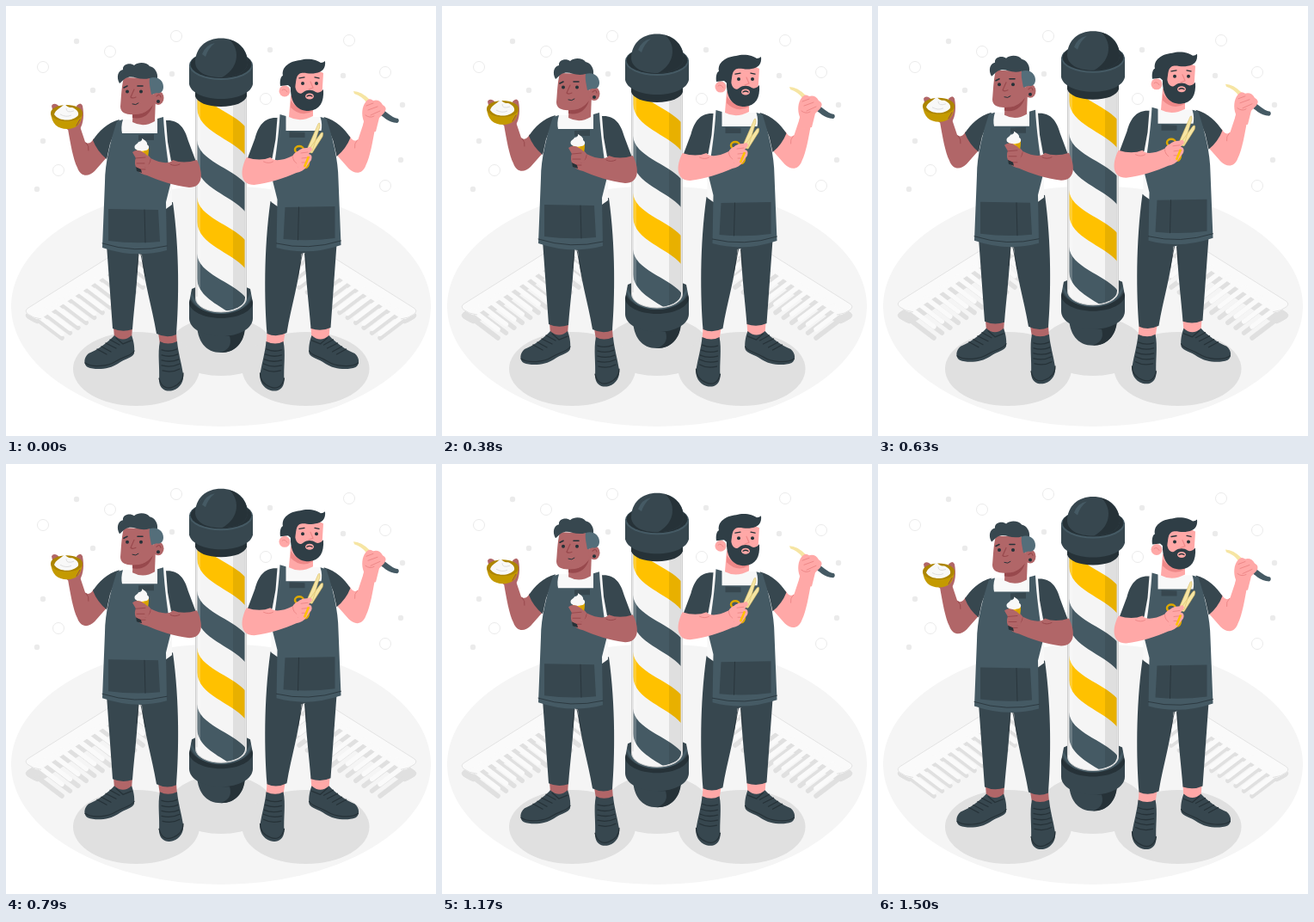
Write an HTML page that moves like this. It is 500 by 500 pixels and loops after 1.54 s.

```html
<!DOCTYPE html>
<html lang="en">
<head>
<meta charset="utf-8">
<title>Barbers</title>
<style>
  html, body { margin: 0; width: 100%; height: 100%; overflow: hidden; background: #fff; }
  svg { display: block; width: 100vw; height: 100vh; }
  .dark { fill: #37474f; }
  .slate { fill: #455a64; }
  .ink { fill: #263238; }
  .white { fill: #f8f8f8; }
  .skin { fill: var(--skin); }
  .shade { fill: var(--shade); }
  .gold { fill: #ffc100; }
  .line { fill: none; stroke: #263238; stroke-linecap: round; stroke-linejoin: round; }
  .fold { fill: none; stroke: var(--shade); stroke-linecap: round; }
  .shadow { fill: #e0e0e0; }
  .brown { --skin: #b16668; --shade: #98494d; }
  .pink { --skin: #ffa8a7; --shade: #ee8888; }
</style>
</head>
<body>
<svg viewBox="0 0 500 500">
  <defs>
    <clipPath id="tube"><path d="M222 95H278V340A28 15 0 0 1 222 340Z"/></clipPath>

    <g id="shoes">
      <path class="skin" d="M125 373H147L146 388Q136 394 126 386ZM177 380H198L199 393Q188 398 179 393Z"/>
      <path class="dark" d="M126 383C119 391 106 400 96 404C90 409 90 417 95 420C105 424 121 422 130 416C138 410 147 409 149 404C150 396 148 388 146 383Q136 392 126 383Z"/>
      <path class="line" d="M92 415C100 421 119 419 128 413C138 407 146 407 149 401" stroke-width="1.2"/>
      <path class="line" d="M121 388L132 394M116 392L128 398M111 396L122 402M106 399L117 405M128 386L136 393L146 389" stroke-width="1.3"/>
      <path class="dark" d="M179 390C176 404 179 420 178 436C179 446 186 449 194 447C203 444 207 436 206 428C204 415 200 402 199 390Q188 395 179 390Z"/>
      <path class="line" d="M178 433C180 443 187 446 194 443C202 440 206 434 206 427" stroke-width="1.2"/>
      <path class="line" d="M181 400Q190 403 199 399M181 406Q191 409 200 405M181 412Q192 415 201 411M181 418Q192 421 202 416M182 424Q193 427 202 422" stroke-width="1.3"/>
    </g>

    <g id="legs">
      <path class="dark" d="M117 278L124 375Q135 380 147 376C149 350 153 320 154 288L158 289C160 320 170 350 175 381Q187 387 198 382C201 345 202 285 194 228L180 232V278Z"/>
      <path class="line" d="M154 289L152 310M157 289L162 314" stroke-width=".8"/>
    </g>

    <g id="torso">
      <path class="white" d="M134 132C120 138 119 160 117 185V212L186 236L193 231V200L190 132Z"/>
      <path class="skin" d="M102 154C99 160 95 161 92 158L85 137L72 143C75 160 78 178 83 188C87 199 96 199 103 192L118 175Z"/>
      <path class="fold" d="M93 159Q97 163 96 168" stroke-width="1"/>
      <path class="dark" d="M132 132C117 136 108 146 101 156Q106 169 117 178L121 160Z"/>
      <path class="slate" d="M129 134L136 132C134 138 134 144 135 148H176L176 131L183 129C184 150 188 180 192 204L186 228L187 284Q150 294 112 281L115 205C115 182 122 155 129 134Z"/>
      <path class="dark" d="M119 236L177 237L179 274Q149 277 119 273ZM154 150L172 149V156L154 156Z"/>
      <path class="line" d="M161 237L162 275M112 276Q150 288 187 279" stroke-width=".8"/>
      <path class="dark" d="M186 133C201 132 208 142 212 157L221 181Q204 187 192 180L188 158Z"/>
    </g>

    <g id="forearm">
      <path class="skin" d="M222 179C230 195 229 211 213 211C195 209 178 203 164 197C153 195 148 187 151 177C155 168 165 171 168 177C180 183 190 184 194 179Q206 184 222 179Z"/>
      <path class="fold" d="M202 184Q196 187 191 184M168 178Q168 184 162 187M152 184L161 184M154 190L162 190" stroke-width="1"/>
    </g>

    <g id="comb">
      <path d="M26 351L150 273L165 281L41 363Q36 365 32 362L25 358Q21 354 26 351Z"/>
      <g id="teeth"></g>
    </g>
  </defs>

  <g fill="none" stroke="#ebebeb" id="rings"></g>
  <g fill="#ebebeb" id="dots"></g>
  <ellipse cx="250" cy="349" rx="244" ry="140" fill="#f5f5f5"/>
  <g class="shadow">
    <ellipse cx="250" cy="396" rx="60" ry="34"/>
    <ellipse cx="151.500" cy="422" rx="73.500" ry="43"/>
    <ellipse cx="348.500" cy="422" rx="74" ry="43"/>
  </g>
  <g class="shadow" stroke="#e0e0e0">
    <use href="#comb" y="5"/>
    <use href="#comb" y="5" transform="matrix(-1 0 0 1 500 0)"/>
  </g>

  <g id="float">
    <g fill="#fafafa" stroke="#fafafa">
      <use href="#comb"/>
      <use href="#comb" transform="matrix(-1 0 0 1 500 0)"/>
    </g>
    <path d="M41 364L32 362L25 358Q21 354 26 351L150 273M459 364L468 362L475 358Q479 354 474 351L350 273" fill="none" stroke="#e3e3e3"/>

    <!-- pole -->
    <path class="dark" d="M222 368C222 390 232 403 250 403S278 390 278 368Z"/>
    <path class="ink" d="M250 384C262 384 272 380 278 374C277 392 266 403 250 403C262 398 262 391 260 384Z"/>
    <path class="dark" d="M216 329Q250 312 284 329L287 345V363C287 375 271 384 250 384S213 375 213 363V345Z"/>
    <path class="ink" d="M213 345C213 354 229 363 250 363S287 354 287 345L286 341Q277 357 250 357T214 341Z"/>
    <path class="slate" d="M216 332C218 345 232 354 250 354S282 345 284 332L285 337C282 350 268 358 250 358S218 350 215 337Z"/>
    <path d="M220.500 95H279.500V340A29.500 16 0 0 1 220.500 340Z" fill="#f5f5f5" stroke="#cfcfcf"/>
    <g clip-path="url(#tube)">
      <g id="stripes"></g>
      <path d="M264 95H278V360H264Z" opacity=".09"/>
      <path d="M222 95H226V360H222Z" fill="#fff" opacity=".2"/>
    </g>
    <path d="M222 105V338M278 105V338" stroke="#d5d5d5" fill="none"/>
    <path class="ink" d="M220 90H280V105C278 112 266 117 250 117S222 112 220 105Z"/>
    <path class="dark" d="M213 68H287V91C285 101 270 108 250 108S215 101 213 91Z"/>
    <ellipse class="slate" cx="250" cy="69" rx="37" ry="17"/>
    <ellipse class="ink" cx="250" cy="68" rx="35.500" ry="16"/>
    <path class="dark" d="M220 66C220 48 233 37.500 250 37.500S281 48 281 66C280 77 267 83 250 83S221 77 220 66Z"/>
    <path class="ink" d="M260 39C273 43 281 54 281 66C280 77 267 83 251 83C269 74 274 53 260 39Z"/>
    <path class="slate" d="M228 56Q232 45 243 43Q235 49 232 59Z"/>

    <!-- left barber -->
    <g class="brown">
      <use href="#shoes"/>
      <use href="#legs"/>
      <use href="#torso"/>
      <path class="skin" d="M148 115L147 135Q160 142 173 134L174 108Z"/>
      <path class="shade" d="M147 124Q160 129 171 115Q165 133 147 130Z"/>
      <path class="skin" d="M137 83C134 95 134 107 133 117C133 125 142 127 150 126C162 126 170 118 172 110L171 84Z"/>
      <ellipse class="skin" cx="177" cy="107" rx="6.500" ry="8"/>
      <path class="fold" d="M175 105Q179 101 180 106M149 97L145 106Q147 108 151 106" stroke-width="1.200"/>
      <path class="dark" d="M132 90C128 83 130 75 136 74C135 68 144 65 149 69C155 64 164 66 167 70C173 71 177 78 176 84L168 90L167 84C155 87 149 81 142 83C137 84 135 88 132 90Z"/>
      <path d="M167 84C175 81 183 86 183 94C183 100 179 102 175 101L169 103C168 96 166 90 167 84Z" fill="#546e7a"/>
      <circle class="ink" cx="141" cy="99.500" r="2"/>
      <circle class="ink" cx="157" cy="99.500" r="2"/>
      <circle class="ink" cx="177" cy="111" r="2"/>
      <path class="line" d="M137 95L141 93M153 93L159 93" stroke-width="1.600"/>
      <path class="line" d="M147 114Q151 116 154 113" stroke-width="1"/>

      <path class="skin" d="M72 144C65 138 54 126 53 116Q55 112 60 115L70 126L84 125L82 116Q87 111 89 116C91 127 90 136 86 143Z"/>
      <path d="M52 124C53 137 60 143 71 143S88 137 89 124Z" fill="#c49a00"/>
      <ellipse cx="70.500" cy="124.500" rx="18.500" ry="9.500" fill="#ad8500"/>
      <path class="white" d="M56 126C58 120 63 119 68 114C71 116 71 118 77 118C82 120 85 123 84 127C79 134 62 135 56 126Z"/>
      <path d="M70 119Q70 125 79 122M63 126Q70 130 76 127" fill="none" stroke="#dedede"/>
      <path class="fold" d="M82 139L86 132" stroke-width="1"/>

      <use href="#forearm"/>
      <path class="ink" d="M151 187L157 190L158 194L152 192Z"/>
      <path class="gold" d="M152 165H166L165 175L153 177Z"/>
      <path d="M160 166H166L165 175L161 176Z" fill="#d9a400"/>
      <path class="white" d="M150 166C148 161 153 161 154 158Q159 157 158 154C162 156 165 159 164 161C168 163 166 168 162 168Q154 170 150 166Z"/>
      <path class="skin" d="M147 170Q153 165 161 171L168 177L165 187L153 188Q148 184 151 177Z"/>
      <path class="fold" d="M151 177L162 176M152 183L161 183" stroke-width="1"/>
    </g>

    <!-- right barber -->
    <g class="pink">
      <g transform="matrix(-1 0 0 1 501.500 0)">
        <use href="#shoes"/>
        <use href="#legs" y="-1"/>
        <use href="#torso" y="-3"/>
      </g>
      <path class="skin" d="M331 104L329 129Q342 136 357 128V116Z"/>
      <path class="shade" d="M331 110Q339 122 357 122Q343 130 331 118Z"/>
      <circle class="skin" cx="324" cy="99" r="6.500"/>
      <path class="fold" d="M321 98Q324 95 327 100" stroke-width="1"/>
      <path class="skin" d="M335 76C333 90 332 102 335 111Q353 124 367 110L369 78Q350 68 335 76Z"/>
      <g fill="#2f3e46">
        <path d="M319 93C318 86 320 81 322 81C320 71 330 64 342 63C352 60 362 63 366 66Q369 66 371 64C372 72 368 77 360 78C352 80 346 76 341 79C336 82 338 91 335 98L328 92Z"/>
        <path d="M331 92L336 92C337 101 342 104 346 100C350 97 356 97 360 100C364 102 367 99 369 97C370 112 365 121 352 122C338 122 330 112 331 92Z"/>
      </g>
      <ellipse class="skin" cx="353" cy="105" rx="5" ry="3.500"/>
      <path class="line" d="M350 105Q353 103 356 105M341 84L347 83M359 83L364 84" stroke-width="1.300"/>
      <circle class="ink" cx="345" cy="90" r="2"/>
      <circle class="ink" cx="361" cy="90" r="2"/>
      <path class="fold" d="M354 88L357 95L352 97" stroke-width="1.200"/>

      <path d="M404 99Q413 99 423 109L419 112Q414 105 405 102Z" fill="#f6e5a3"/>
      <path class="slate" d="M433 119C443 121 447 130 456 131Q458 134 455 136C444 136 438 127 431 124Z"/>
      <path class="skin" d="M416 134C413 126 414 117 418 112Q422 106 427 110Q434 108 438 115Q444 118 440 124L434 130L430 146L414 148Z"/>
      <path class="fold" d="M419 116L427 113M421 121L432 117M424 127L435 122M418 127Q423 131 428 128" stroke-width="1"/>

      <g fill="none" stroke="#dda900" stroke-width="2.500">
        <ellipse cx="341" cy="167" rx="5" ry="4"/>
        <ellipse cx="348" cy="182" rx="4" ry="6"/>
      </g>
      <use href="#forearm" transform="matrix(-1 0 0 1 501.500 -3)"/>
      <path d="M349 169L363 137Q365 134 365 140L356 169ZM350 170L366 148Q370 145 368 152L356 171Z" fill="#f6e5a3" stroke="#d9bd65" stroke-width=".6"/>
      <path class="skin" d="M335 174Q341 164 351 165Q355 162 356 167L352 172Q357 173 355 179L349 187L340 189Z"/>
      <path class="fold" d="M343 171L351 170M344 177L353 176M344 182L350 182" stroke-width="1"/>
      <path d="M347 187L352 175" stroke="#ffc100" stroke-width="2.500"/>
    </g>
  </g>
</svg>
<script>
  const PERIOD = 1540, LEAD = 40, RISE = 10;
  const fill = (id, items, draw) => document.getElementById(id).innerHTML = items.map(draw).join('');
  const range = n => [...Array(n).keys()];
  const circle = r => ([x, y]) => `<circle cx="${x}" cy="${y}" r="${r}"/>`;

  fill('rings', [[43, 71], [121, 53], [198, 35], [61, 191], [302, 108], [399, 40], [441, 77], [441, 209]], circle(6.5));
  fill('dots', [[82, 41], [101, 98], [193, 79], [43, 157], [36, 213], [307, 51], [392, 81], [461, 115], [459, 179]], circle(3.2));
  fill('teeth', range(13), i =>
    `<path d="M${36 + 9.4 * i} ${359 - 5.9 * i}l29 22" stroke-width="5.5" stroke-linecap="round"/>`);
  fill('stripes', range(4), i =>
    `<path class="${i % 2 ? 'slate' : 'gold'}" transform="translate(0 ${66 * (i - 1)})"
      d="M222 156C224 180 262 188 278 206V239C262 220 224 212 222 185Z"/>`);

  const float = document.getElementById('float');
  function frame() {
    const phase = (performance.now() + LEAD) % PERIOD / PERIOD;
    const lift = RISE * (1 - Math.abs(1 - 2 * phase));
    float.setAttribute('transform', `translate(0 ${0.5 - lift})`);
    requestAnimationFrame(frame);
  }
  frame();
</script>
</body>
</html>
```
